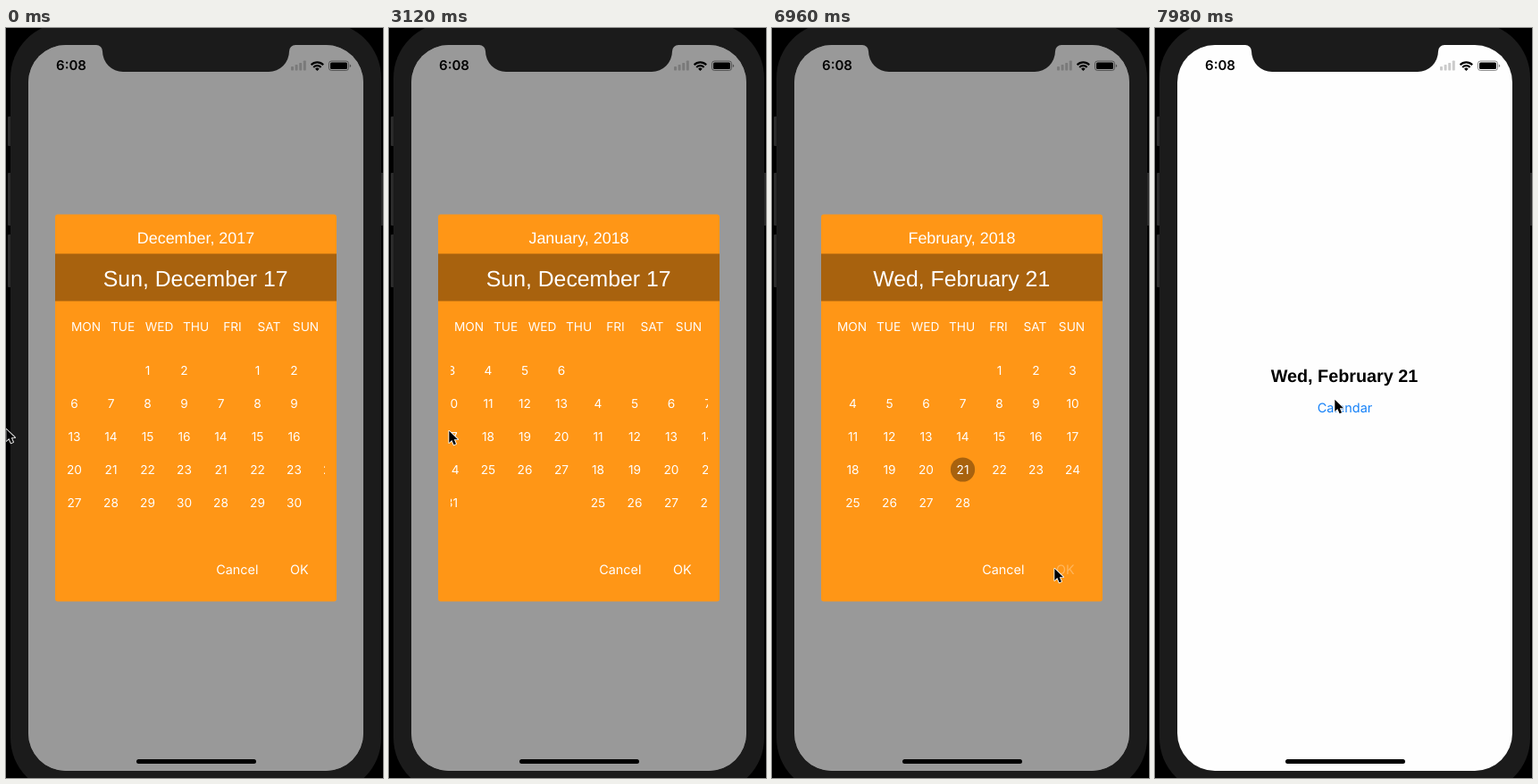
Write an HTML page that moves like this. It is 422 px wide and 839 px high and loops after 8 s.

```html
<!DOCTYPE html>
<html lang="en">
<head>
<meta charset="utf-8">
<title>Calendar dialog</title>
<style>
  html, body { margin: 0; width: 100%; height: 100%; overflow: hidden; background: #000; }
  svg { display: block; width: 422px; height: 839px; }
  text {
    text-anchor: middle; text-rendering: geometricPrecision;
    font-family: Inter, Roboto, sans-serif; font-size: 13.7px;
  }
  .head { font-family: "Liberation Sans", Arial, sans-serif; }
  .button { font-size: 14.4px; }
  #panel text { fill: #fff; }
  #clock { font-size: 15px; font-weight: 600; }
  #result { font-size: 19.8px; font-weight: 700; }
  #month { font-size: 17.9px; }
  #date { font-size: 24.8px; }
</style>
</head>
<body>
<svg viewBox="0 0 422 839">
  <defs>
    <clipPath id="screen"><rect x="25" y="19" width="375" height="812" rx="42"/></clipPath>
    <clipPath id="gridClip"><rect x="69" y="360" width="288" height="220"/></clipPath>
  </defs>

  <!-- phone body -->
  <g fill="#2b2b2b">
    <rect x="2" y="99" width="8" height="33" rx="1"/>
    <rect x="2" y="162" width="8" height="59" rx="1"/>
    <rect x="2" y="231" width="8" height="59" rx="1"/>
    <rect x="416" y="162" width="8" height="59" rx="1"/>
  </g>
  <rect x="5" y="-6" width="415" height="862" rx="62" fill="#1b1b1b"/>

  <g clip-path="url(#screen)">
    <rect x="25" y="19" width="375" height="812" fill="#fefefe"/>

    <!-- status bar -->
    <text id="clock" x="73" y="47.4">6:08</text>
    <g opacity=".2">
      <rect x="319" y="43" width="3" height="4.5" rx=".7"/>
      <rect x="323.6" y="41" width="3" height="6.5" rx=".7"/>
      <rect x="328.2" y="39" width="3" height="8.5" rx=".7"/>
      <rect x="332.8" y="36.5" width="3" height="11" rx=".7"/>
    </g>
    <g fill="none" stroke="#000" stroke-width="2.2">
      <path d="M341.6 41.2a9.6 9.6 0 0 1 13.6 0"/>
      <path d="M344.2 43.9a5.9 5.9 0 0 1 8.4 0"/>
    </g>
    <path d="M348.4 48l-2.3-2.3a3.3 3.3 0 0 1 4.6 0z"/>
    <rect x="361.5" y="37" width="22" height="10.5" rx="2.8" fill="none" stroke="#000" stroke-opacity=".45"/>
    <rect x="363" y="38.5" width="19" height="7.5" rx="1.5"/>
    <path d="M384.8 40.5q1.3.4 1.3 1.8t-1.3 1.8z" fill-opacity=".5"/>

    <!-- page behind the dialog -->
    <text id="result" class="head" x="212" y="395.5">Wed, February 21</text>
    <text id="link" class="button" x="212.5" y="430.3">Calendar</text>

    <rect id="dim" x="25" y="19" width="375" height="812"/>

    <g id="panel">
      <rect x="55" y="208.5" width="315" height="433" rx="3" fill="#ff9616"/>
      <rect x="55" y="252.5" width="315" height="53" fill="#a8620e"/>
      <text id="month" class="head" x="212.5" y="240.8"></text>
      <text id="date" class="head" x="212.2" y="288.8"></text>
      <g id="weekdays"></g>
      <g clip-path="url(#gridClip)">
        <g id="pages"><circle id="mark" fill="#a8620e"/></g>
      </g>
      <text class="button" x="258.8" y="610.5">Cancel</text>
      <text id="ok" class="button" x="328.3" y="610.5">OK</text>
    </g>
    <rect x="146" y="818" width="134" height="5" rx="2.5"/>
  </g>

  <!-- notch -->
  <path d="M101 18V19A7 7 0 0 1 108 26A23 23 0 0 0 131 49H294A23 23 0 0 0 317 26A7 7 0 0 1 324 19V18Z" fill="#1b1b1b"/>

  <path id="cursor" d="M.3 .8V14L3.3 11.1L5.6 16.3L8 15.2L5.8 10.2H10Z"
        stroke="#fff" stroke-width="1.7" stroke-linejoin="round" paint-order="stroke"/>
</svg>
<script>
const LOOP = 8000, TICK = 147.7;   // the picture advances in whole ticks
const PAGE = 287, CELL = 41, ROW = 37;
const MONTHS = [
  { name: 'December, 2017', first: 5, days: 31 },
  { name: 'January, 2018', first: 1, days: 31 },
  { name: 'February, 2018', first: 4, days: 28 }
];
const PICKS = [
  { at: 0, label: 'Sun, December 17' },
  { at: 27, day: 13, label: 'Tue, February 13' },
  { at: 37, day: 22, label: 'Thu, February 22' },
  { at: 41, day: 21, label: 'Wed, February 21' }
];
const SWIPE = 18, OK_DOWN = 47, CLOSED = 49;

// pointer strokes: [first tick, last tick, end x, end y]
const HOME = [0, 448];
const STROKES = [
  [0, 6, 303, 445],
  [8, 10, 121, 444],
  [11, 13, 35, 436],
  [14, 17, 228, 447],
  [SWIPE, 21, 67, 450],
  [21, 25, 162, 460],
  [33, 36, 248, 493],
  [38, 40, 195, 493],
  [41, 46, 316, 604],
  [50, 54, 201, 415]
];

const $ = id => document.getElementById(id);
const colX = col => 90.5 + col * CELL;
const rowY = row => 383 + row * ROW;

// eased progress from tick a to tick b
function ease(tick, a, b) {
  const u = Math.min(1, Math.max(0, (tick - a) / (b - a)));
  return u * u * (3 - 2 * u);
}

function pointer(tick) {
  return STROKES.reduce(([x, y], [a, b, toX, toY]) => {
    const u = ease(tick, a, b);
    return [x + (toX - x) * u, y + (toY - y) * u];
  }, HOME);
}

// a released swipe settling on January, then a full swipe to February
function scroll(tick) {
  return PAGE - 150 * 0.4 ** tick + PAGE * ease(tick, SWIPE, SWIPE + 6);
}

function addText(parent, x, y, label) {
  const node = document.createElementNS('http://www.w3.org/2000/svg', 'text');
  node.setAttribute('x', x);
  node.setAttribute('y', y);
  node.textContent = label;
  parent.append(node);
}

function cellOf(month, day) {
  const slot = MONTHS[month].first + day - 1;
  return [month * PAGE + colX(slot % 7), rowY(Math.floor(slot / 7))];
}

function build() {
  'MON TUE WED THU FRI SAT SUN'.split(' ')
    .forEach((day, i) => addText($('weekdays'), colX(i) - 1, 338.8, day));
  MONTHS.forEach((month, m) => {
    for (let day = 1; day <= month.days; day++) {
      const [x, y] = cellOf(m, day);
      addText($('pages'), x, y + 5, day);
    }
  });
}

function set(id, attrs) {
  for (const name in attrs) $(id).setAttribute(name, attrs[name]);
}

function draw(tick) {
  set('cursor', { transform: `translate(${pointer(tick)})` });

  const offset = scroll(tick);
  set('pages', { transform: `translate(${-offset} 0)` });
  $('month').textContent = MONTHS[Math.round(offset / PAGE)].name;

  const { at, day, label } = PICKS.filter(pick => pick.at <= tick).pop();
  $('date').textContent = label;
  const [cx, cy] = cellOf(2, day || 1);
  set('mark', { cx, cy, r: day ? 13.6 + 3 * 0.4 ** (tick - at) : 0 });

  // closing: the panel shrinks and fades along with the dimming
  const gone = tick >= CLOSED ? 1 : Math.max(0, tick - OK_DOWN) * 0.4;
  const scale = 1 - 0.39 * gone;
  set('dim', { opacity: 0.4 * (1 - gone) });
  set('panel', {
    opacity: 1 - gone,
    transform: `translate(212.5 425) scale(${scale}) translate(-212.5 -425)`
  });
  set('ok', { opacity: tick >= OK_DOWN ? 0.3 : 1 });
  set('link', { fill: gone === 1 ? '#1480f8' : '#606060' });
}

let start;
function frame(now) {
  start ??= now;
  draw(Math.floor((now - start) % LOOP / TICK));
  requestAnimationFrame(frame);
}

build();
draw(0);
requestAnimationFrame(frame);
</script>
</body>
</html>
```
